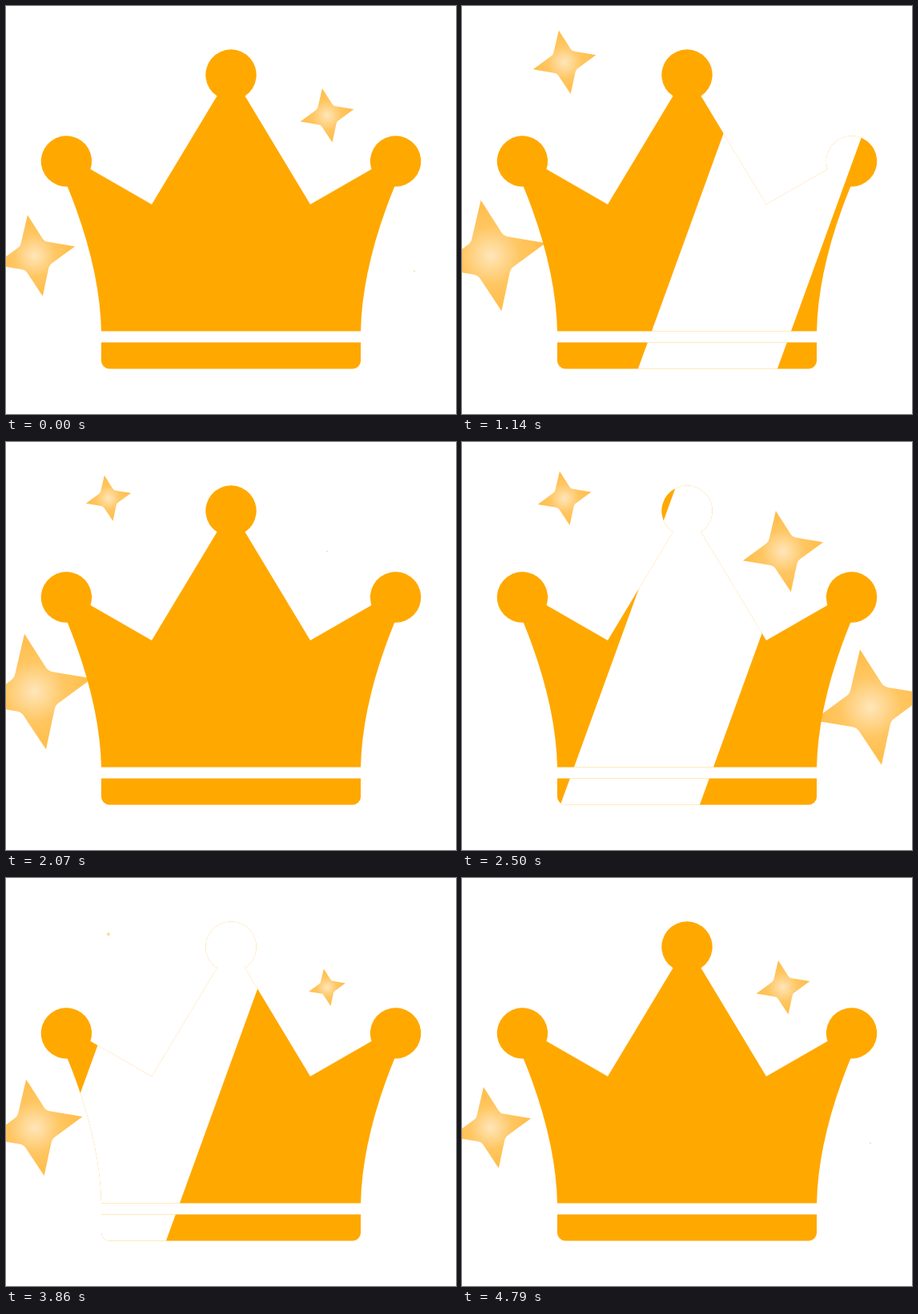
These frames come from a looping animation (562 by 510 pixels, 4.87 s). An HTML page:

```html
<!DOCTYPE html>
<html lang="en">
<head>
<meta charset="utf-8">
<title>Crown</title>
<style>
  html, body { margin: 0; width: 100%; height: 100%; overflow: hidden; background: #fff; }
  svg { display: block; width: 562px; height: 510px; }
</style>
</head>
<body>
<svg viewBox="0 0 562 510">
  <defs>
    <radialGradient id="glow" gradientUnits="userSpaceOnUse" cx="0" cy="0" r="64">
      <stop offset="0" stop-color="#ffe6ba"/>
      <stop offset="0.6" stop-color="#ffc661"/>
      <stop offset="1" stop-color="#ffbf4e"/>
    </radialGradient>
    <path id="star" fill="url(#glow)" d="M-13-72.3L14-30Q17-25.5 23-24.5L71.5-16.5L30 14Q25.5 17 24.5 23L14 72.3L-14 30Q-17 25.5-23 24.5L-71.5 16.5L-30-14Q-25.5-17-24.5-23Z"/>
    <path id="crown" d="M263.5 112.5A31.7 31.7 0 1 1 298.5 112.5L380 248L456.5 204.1A31.7 31.7 0 1 1 485.2 225.7Q444.8 325 443 406.5H119Q117.2 325 76.8 225.7A31.7 31.7 0 1 1 105.5 204.1L182 248Z
      M119 420.5H443V443.5A10 10 0 0 1 433 453.5H129A10 10 0 0 1 119 443.5Z"/>
    <clipPath id="inside"><use href="#crown"/></clipPath>
  </defs>
  <g id="stars"></g>
  <use href="#crown" fill="#ffa800"/>
  <g clip-path="url(#inside)">
    <path id="shine" fill="#fff" d="M164.4 0H338.4L157 500H-17Z"/>
  </g>
</svg>
<script>
  const LOOP = 4870, FPS = 14, LAST = 67, TICKS = 120;
  const TWINKLE = 24;             // ticks per star pulse
  const SWEEP = 36, SPEED = 48.5; // ticks per shine pass, px per tick

  const stars = [
    { x: 36, y: 312, lag: 6 },
    { x: 128, y: 70.3, lag: 0 },
    { x: 401, y: 136.7, lag: 15 },
    { x: 510, y: 331.5, lag: 19 }
  ];
  const layer = document.getElementById('stars');
  const shine = document.getElementById('shine');

  for (const s of stars) {
    s.node = document.createElementNS('http://www.w3.org/2000/svg', 'use');
    s.node.setAttribute('href', '#star');
    layer.appendChild(s.node);
  }

  const smooth = v => {
    const u = Math.min(1, Math.max(0, v));
    return u * u * (3 - 2 * u);
  };

  // Grow, shrink, then rest at zero until the next pulse.
  const pulse = p => p < 9.8 ? smooth((p + 0.12) / 9.6) : 1 - smooth((p - 9.78) / 10);

  function draw(ms) {
    // Steps begin on times rounded to 10 ms, so allow a little slack.
    const step = Math.min(LAST, Math.floor((ms % LOOP) * FPS / 1000 + 0.1));
    const tick = Math.round(step * TICKS / LAST);
    for (const s of stars) {
      const p = (tick + s.lag) % TWINKLE;
      const size = p ? pulse(p) : 0;
      s.node.setAttribute('transform', `translate(${s.x} ${s.y}) scale(${size})`);
    }
    const x = 220 + SPEED * (tick % SWEEP - 29);
    shine.setAttribute('transform', `translate(${x} 0)`);
  }

  const start = performance.now();
  function frame() {
    draw(performance.now() - start);
    requestAnimationFrame(frame);
  }
  draw(0);
  requestAnimationFrame(frame);
</script>
</body>
</html>
```
